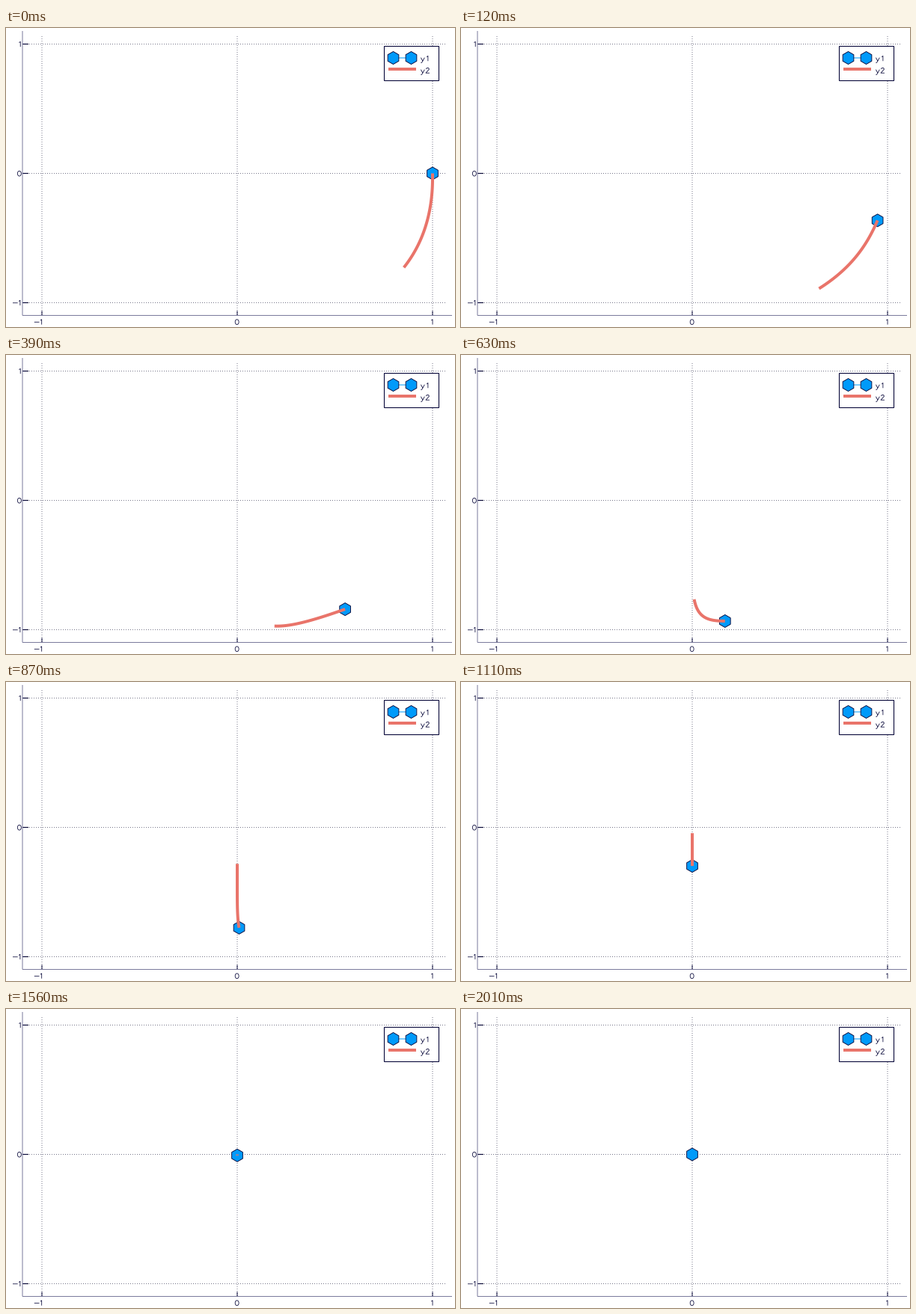
These frames come from a looping animation (600x400 px, 2400 ms). A matplotlib script:

```python
import numpy as np
import matplotlib.pyplot as plt
from matplotlib.animation import FuncAnimation
from matplotlib.patches import Polygon, Rectangle

W, H, DPI = 600, 400, 100
FRAMES, STEP = 80, 30
PX = 72 / DPI
INK, AXIS, GRID = "#08083a", "#7b7b9c", "#77778a"
BLUE, CORAL = "#009afa", "#e9746a"
HORIZON = 8.3

plt.rcParams["path.snap"] = False


def to_px(x, y):
    return 309 + 261 * x, 194.5 - 173 * y


def state_at(k):
    """State at step k: x eases out to 0, y dips towards -1 and recovers."""
    x = np.maximum(0, 1 - (k / 35) ** 2) ** 4
    y = -np.tanh(k / 10.5) / (1 + np.exp((k - 33.8) / 3.75))
    return x, y


def forecast(k):
    """The coming states, drifting outwards the further they look ahead."""
    s = np.linspace(0, 1, 40)
    x, y = state_at(k + HORIZON * s)
    drift = s ** 1.5 * np.tanh(4 * x)
    return x + 0.06 * drift, y - 0.07 * drift


def hexagon(x, y, r=8.5):
    a = np.pi / 2 + np.arange(6) * np.pi / 3
    return np.column_stack([x + r * np.cos(a), y + r * np.sin(a)])


fig = plt.figure(figsize=(W / DPI, H / DPI), dpi=DPI, facecolor="white")
ax = fig.add_axes([0, 0, 1, 1])
ax.set_xlim(0, W)
ax.set_ylim(H, 0)
ax.axis("off")


def line(xs, ys, color=INK, width=1, z=2, **kw):
    kw.setdefault("solid_capstyle", "butt")
    return ax.plot(xs, ys, color=color, lw=width * PX, zorder=z, **kw)[0]


def marker(x, y, z):
    return ax.add_patch(Polygon(hexagon(x, y), fc=BLUE, ec=INK,
                                lw=0.9 * PX, zorder=z))


# Thin stroke glyphs, y up from the baseline
turn = np.linspace(0, 2 * np.pi, 25)
GLYPHS = {
    "-": [[(0, 3.5), (7, 3.5)]],
    "0": [list(zip(3 + 2.6 * np.sin(turn), 3.6 + 3.6 * np.cos(turn)))],
    "1": [[(1.6, 5.8), (3.4, 7.2), (3.4, 0)]],
    "2": [[(0.7, 5.5), (2, 7.2), (4, 7.2), (5.1, 5.4), (0.4, 0), (5.6, 0)]],
    "y": [[(0.4, 4.8), (3, 0)], [(5.6, 4.8), (3, 0), (1.6, -2.2), (0.4, -2.4)]],
}


def text(x, base, chars, size=0.95):
    for c in chars:
        for stroke in GLYPHS[c]:
            gx, gy = size * np.array(stroke).T
            line(x + gx, base - gy, width=0.8, z=8)
        x += 7 * size


dots = dict(color=GRID, z=1, ls=(0, (1, 2)), dash_capstyle="butt")
for v in (-1, 0, 1):
    x, y = to_px(v, v)
    line([x, x], [384, 10], **dots)
    line([x, x], [384.5, 378.5])
    line([22, 587], [y, y], **dots)
    line([22, 30], [y, y], width=1.2)
    name = str(v)
    text(x - 3.2 - 7 * (v < 0), 396.7, name)
    text(15 - 6 * (v < 0) + (v > 0), y + 3.6, name)
line([22, 22], [4, 384.5], AXIS)
line([22, 596], [384.5, 384.5], AXIS)

# Legend
ax.add_patch(Rectangle((505.5, 24.5), 73, 46, fc="white", ec=INK,
                       lw=1.1 * PX, zorder=6))
line([517.5, 541.5], [40, 40], BLUE, z=7)
for x in (517.5, 541.5):
    marker(x, 40, 7.5)
line([511, 548], [55, 55], CORAL, 4, z=7)
text(554, 44.2, "y1")
text(554, 60.2, "y2")

dot = marker(*to_px(1, 0), 4)
trail = line([], [], CORAL, 4, z=5, solid_joinstyle="round")


def update(k):
    dot.set_xy(hexagon(*to_px(*state_at(k))))
    trail.set_data(*to_px(*forecast(k)))
    return dot, trail


anim = FuncAnimation(fig, update, frames=FRAMES, interval=STEP,
                     repeat=True, repeat_delay=0, blit=False)
plt.show()
```
